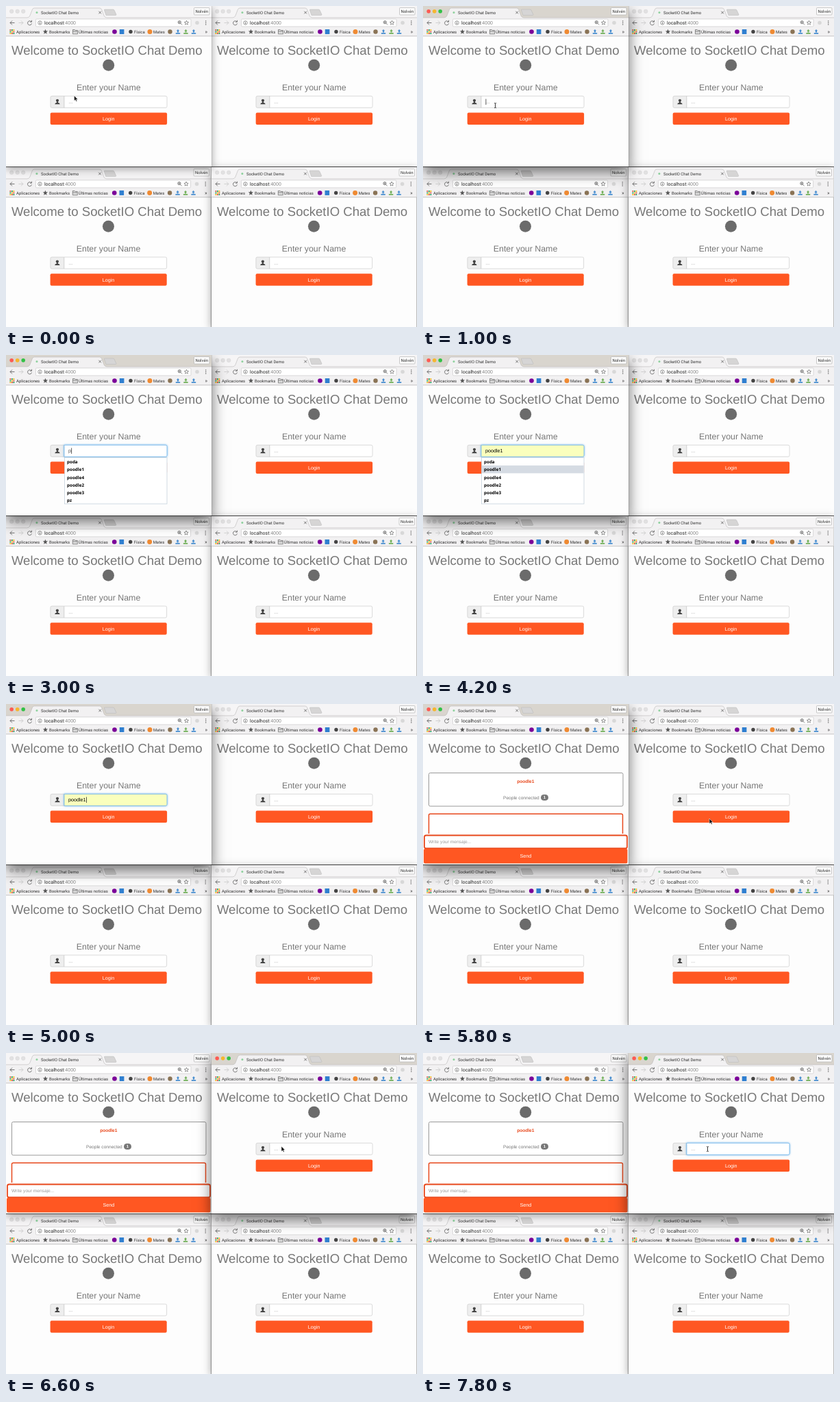
An HTML page that plays this animation: 600x468 px, repeating every 8 s.

```html
<!DOCTYPE html>
<html lang="en">
<head>
<meta charset="utf-8">
<title>Chat demo</title>
<style>
  html, body { margin: 0; width: 100%; height: 100%; overflow: hidden; background: #777; }
  #stage { position: relative; width: 600px; height: 468px; overflow: hidden; }
  .win { position: absolute; z-index: 1; width: 299.5px; height: 234px; box-shadow: 0 0 1px rgba(0,0,0,.5), 0 3px 12px rgba(0,0,0,.38); }
  .win.low { height: 233px; }
  .win.front { z-index: 2; }
  .win.active { z-index: 5; box-shadow: 0 0 1px rgba(0,0,0,.6), 0 8px 20px rgba(0,0,0,.58); }
  svg { display: block; overflow: hidden; width: 100%; height: 100%; }
  text { text-rendering: geometricPrecision; }
  .ui { font: 6px Roboto, sans-serif; fill: #333; }
  .page { font: 7.2px "Liberation Sans", Arial, sans-serif; fill: #777; }
  .mid { text-anchor: middle; }
  .strip { fill: #f6f5f6; }
  .light { fill: #e2e1e2; stroke: #d2d1d2; stroke-width: .4; }
  .active .strip { fill: #d9d5ce; }
  .active .light { stroke: none; fill: var(--on); }
  .line { fill: none; stroke: #666; stroke-width: .9; }
  .field { fill: #fff; stroke: #ccc; stroke-width: .7; }
  .focus .field { stroke: #66afe9; filter: drop-shadow(0 0 1.5px #66afe9); }
  .filled .field { fill: #faffbd; }
  .typed { fill: #555; }
  .filled .typed { fill: #000; }
  .off { display: none; }
  .list { font: bold 6.3px "Open Sans", "Noto Sans", sans-serif; fill: #000; }
  #mouse { position: absolute; z-index: 9; left: 0; top: 0; width: 12px; height: 14px; overflow: visible; }
</style>
</head>
<body>
<div id="stage">
  <svg id="mouse">
    <path id="arrow" d="M0 0V7.600L1.800 6L3 8.600L4.300 8L3.100 5.500H5.400Z" fill="#111" stroke="#fff" stroke-width=".5"/>
    <path id="beam" d="M-1.5-3.5Q0-3.5 0-2.5Q0-3.5 1.5-3.5M0-2.5V2.5M-1.5 3.5Q0 3.5 0 2.5Q0 3.5 1.5 3.5" fill="none" stroke="#222" stroke-width=".9"/>
  </svg>
</div>
<script>
const ORANGE = '#ff5722', RIM = '#e8481c';
const NAME = 'poodle1';
const NAMES = ['poda', NAME, 'poodle4', 'poodle2', 'poodle3', 'pz'];
const ROW = 11.3;

const text = (x, y, s, cls = '', more = '') => `<text x="${x}" y="${y}" class="${cls}" ${more}>${s}</text>`;
const rect = (x, y, w, h, fill, more = '') => `<rect x="${x}" y="${y}" width="${w}" height="${h}" fill="${fill}" ${more}/>`;
const dot = (x, y, r, fill, more = '') => `<circle cx="${x}" cy="${y}" r="${r}" fill="${fill}" ${more}/>`;
const line = (d, more = '') => `<path class="line" d="${d}" ${more}/>`;

function star(x, y, r, more) {
  const pts = Array.from({length: 10}, (_, i) => {
    const a = i * Math.PI / 5 - Math.PI / 2, q = i % 2 ? r * .45 : r;
    return `${(x + q * Math.cos(a)).toFixed(1)},${(y + q * Math.sin(a)).toFixed(1)}`;
  });
  return `<polygon points="${pts.join(' ')}" ${more}/>`;
}

const tray = (x, color) =>
  `<path d="M${x} 34l2.300 2.600h-1.300v2h-2v-2h-1.300z" fill="${color}"/>` + rect(x - 3.2, 39, 6.4, 1.8, color);

function appGrid() {
  const colors = ['#db4437', '#0f9d58', '#f4b400'];
  let s = '';
  for (let row = 0; row < 3; row++)
    for (let col = 0; col < 3; col++)
      s += rect(5.5 + col * 2.5, 34.2 + row * 2.5, 1.8, 1.8, colors[(row + col) % 3]);
  return s;
}

function chrome() {
  const lights = ['#fc5b53', '#f6b62e', '#32c146']
    .map((c, i) => dot(8.2 + i * 8.5, 7.8, 2.8, '', `class="light" style="--on:${c}"`)).join('');
  return `<g class="ui">
    <rect class="strip" width="300" height="18"/>${lights}
    <path d="M146 13.5L143.5 6Q143 5 144.5 5H156Q157.5 5 158 6L161 12.5Q161 13.5 160 13.5Z" fill="#d6d5d5" stroke="#b5b4b4" stroke-width=".5"/>
    ${rect(0, 17, 300, 27, '#f2f1f2')}
    <path d="M0 17H31Q34 17 35 14L38.5 5Q39.3 3 41.5 3H136.5Q138.8 3 139.6 5L143 14Q144 17 147 17H300" fill="#f2f1f2" stroke="#b9b8b8" stroke-width=".6"/>
    ${rect(33, 16.6, 112, 1.2, '#f2f1f2')}
    ${dot(45, 9.5, 1.5, '#8fd19e')}
    ${text(51, 11.6, 'SocketIO Chat Demo')}
    ${line('M135.4 7.7l3.6 3.6m0-3.6l-3.6 3.6')}
    ${rect(274.5, 2.5, 22.5, 10.5, '#fbfbfb', 'rx="1" stroke="#aaa" stroke-width=".6"')}
    ${text(285.7, 10, 'Nolvén', 'mid')}
    ${line('M12.5 24.5H6m3-3l-3 3l3 3')}
    ${line('M18.5 24.5H25m-3-3l3 3l-3 3', 'style="stroke:#ccc"')}
    ${line('M36.8 22.8A3 3 0 1 0 37.5 25.5M37.5 20.8v2.4h-2.4')}
    ${rect(43.5, 19, 226.5, 11, '#fff', 'rx="1.3" stroke="#c4c3c4" stroke-width=".6"')}
    ${dot(49.5, 24.5, 2.7, 'none', 'stroke="#666" stroke-width=".7"')}
    ${line('M49.5 24v2.2M49.5 22.7v.7')}
    <text x="56" y="27" font-size="7" fill="#222">localhost<tspan fill="#888">:4000</tspan></text>
    ${dot(253.3, 23.7, 2.1, 'none', 'stroke="#555" stroke-width=".8"')}
    ${line('M255 25.4l2 2M252.3 23.7h2m-1-1v2')}
    ${star(263.5, 24.5, 3.3, 'fill="none" stroke="#666" stroke-width=".7"')}
    ${dot(279, 24.5, 2.8, '#d8d8d8')}
    ${[22, 24.5, 27].map(y => dot(291.7, y, .8, '#666')).join('')}
    ${appGrid()}${text(15, 39.8, 'Aplicaciones')}
    ${star(57.5, 37.6, 3.8, 'fill="#555"')}${text(63, 39.8, 'Bookmarks')}
    <path d="M97.5 34.5h2.8l1 1h3.2v5.3h-7zM97.5 37h7" fill="#ddd" stroke="#666" stroke-width=".7"/>
    ${text(106, 39.8, 'Últimas noticias')}
    ${dot(158.5, 37.5, 3.3, '#7b0099')}
    ${rect(165.8, 34, 6.6, 7, '#2f7fd0')}
    ${dot(182, 37.5, 2.7, '#444')}${text(187, 39.8, 'Física')}
    ${dot(210, 37.5, 3.5, '#ef8a32')}${text(215, 39.8, 'Mates')}
    ${dot(239.5, 37.5, 3.2, '#8a7355')}
    ${tray(251, '#4a8fd0')}${tray(262.5, '#72b05a')}${tray(274, '#4a8fd0')}
    ${text(290.5, 39.8, '»', '', 'font-size="7.5"')}
    ${rect(0, 43.5, 300, .8, '#b9b8b9')}
  </g>`;
}

function loginForm() {
  const rows = NAMES.map((n, i) => text(89, 157.9 + i * ROW, n)).join('');
  return `<g class="login">
    ${text(149.8, 123, 'Enter your Name', 'mid', 'font-size="12.4"')}
    <path d="M85 131.3H67q-2 0-2 2V146.300q0 2 2 2H85z" fill="#eee" stroke="#ccc" stroke-width=".7"/>
    ${dot(75, 137.8, 2.1, '#444')}
    <path d="M71.3 143.3q0-2 2.7-2.600v-1.500h2v1.500q2.700.6 2.700 2.600z" fill="#444"/>
    <path class="field" d="M85 131.3H233q2 0 2 2V146.300q0 2-2 2H85z"/>
    ${text(91.5, 142.3, '...', 'hint', 'fill="#999"')}
    ${text(91, 142.3, '', 'typed')}
    <rect class="caret" y="135.5" width=".8" height="8.5" fill="#333"/>
    ${rect(64.7, 155.6, 170.4, 17.5, ORANGE, 'rx="2"')}
    ${text(149.8, 166.8, 'Login', 'mid', 'fill="#fff"')}
    <g class="list">
      ${rect(85.5, 149.5, 149.5, 67.5, '#fff', 'stroke="#bccbd6" stroke-width=".7"')}
      <rect class="pick" x="85.9" width="148.7" height="${ROW}" fill="#d5dbe3"/>${rows}
    </g>
  </g>`;
}

function chatRoom() {
  const small = 'font-size="6.6"';
  return `<g class="chat">
    ${rect(8.5, 100.5, 283.5, 48.5, '#fff', 'rx="2" stroke="#999" stroke-width="1"')}
    ${text(149.8, 115.2, NAME, 'mid', `${small} font-weight="bold" fill="${RIM}"`)}
    ${text(117, 138.5, 'People connected', '', small)}
    ${rect(172, 132, 11, 8.8, '#777', 'rx="4.4"')}
    ${text(177.5, 138.4, '1', 'mid', 'font-size="6" font-weight="bold" fill="#fff"')}
    <path d="M8.500 189V162.300q0-2 2-2H289.500q2 0 2 2V189" fill="#fff" stroke="${RIM}" stroke-width="1.5"/>
    ${rect(0, 189, 300, 45, '#fdfdfd')}
    ${rect(2, 191.5, 296, 19, '#fff', `rx="2.5" stroke="${RIM}" stroke-width="1.8"`)}
    ${text(8, 203.3, 'Write your mensaje...', '', `${small} fill="#999"`)}
    ${rect(1, 211, 297.5, 21.5, ORANGE, 'rx="2"')}
    ${text(149.8, 224.3, 'Send', 'mid', 'fill="#fff"')}
  </g>`;
}

const stage = document.getElementById('stage');
const wins = [[0, 0], [300, 0], [0, 235], [300, 235]].map(([x, y]) => {
  const el = document.createElement('div');
  el.className = y ? 'win low' : 'win';
  el.style.cssText = `left:${x}px;top:${y}px`;
  el.innerHTML = `<svg viewBox="0 0 300 234" preserveAspectRatio="xMinYMin slice">
    ${rect(0, 0, 300, 235, '#fdfdfd')}${chrome()}
    <g class="page">
      ${text(147.3, 71, 'Welcome to SocketIO Chat Demo', 'mid', 'font-size="18.6"')}
      ${dot(149.7, 86.3, 8.5, '#6b6b6b')}
      ${loginForm()}${chatRoom()}
    </g></svg>`;
  stage.append(el);
  const find = c => el.querySelector('.' + c);
  return {el, login: find('login'), chat: find('chat'), hint: find('hint'), typed: find('typed'),
    caret: find('caret'), list: find('list'), pick: find('pick')};
});
wins[0].el.classList.add('front');

const show = (el, on) => el.classList.toggle('off', !on);

function setWin(w, {active, focus, value = '', caret, list, pick = -1, chat, filled}) {
  w.el.classList.toggle('active', !!active);
  w.login.classList.toggle('focus', !!focus);
  w.login.classList.toggle('filled', !!filled);
  show(w.login, !chat);
  show(w.chat, chat);
  show(w.hint, !value);
  show(w.caret, caret);
  show(w.list, list);
  show(w.pick, pick >= 0);
  w.pick.setAttribute('y', 149.8 + pick * ROW);
  w.typed.textContent = value;
  const end = {p: 95.3, [NAME]: 117.2}[value] || 91.5;
  w.caret.setAttribute('x', end);
}

// Pointer stops: time, x, y
const TRAIL = [[0, 99.5, 130.7], [200, 103, 137], [400, 105.5, 145], [5400, 190, 164], [5600, 310, 170],
  [5800, 418, 167], [6000, 410, 152], [6200, 402, 136], [7000, 409, 139], [7200, 415.5, 140]];
const arrow = document.getElementById('arrow'), beam = document.getElementById('beam');
const mouse = document.getElementById('mouse');

function draw(t) {
  const blink = from => t >= from && Math.floor((t - from) / 600) % 2 === 0;
  const filled = t >= 3400 && t < 5400;
  setWin(wins[0], {
    active: t >= 200 && t < 6400,
    focus: t >= 1200 && t < 5400,
    value: filled ? NAMES[t < 3800 ? 0 : 1] : t >= 2600 ? 'p' : '',
    filled,
    caret: t < 2200 ? blink(1000) : t < 3400 || t >= 4800,
    list: t >= 2600 && t < 4800,
    pick: t < 3400 ? -1 : t < 3800 ? 0 : 1,
    chat: t >= 5400
  });
  setWin(wins[1], {active: t >= 6400, focus: t >= 7200, caret: blink(7200) && t < 7800});

  const [, x, y] = TRAIL.filter(p => p[0] <= t).pop();
  const isBeam = t >= 400 && t < 5400 || t >= 7200;
  mouse.style.transform = `translate(${x}px,${y}px)`;
  show(mouse, t < 2400 || t >= 5400);
  show(arrow, !isBeam);
  show(beam, isBeam);
}

wins.slice(2).forEach(w => setWin(w, {}));
const start = performance.now();
let last = -1;
function tick() {
  const t = Math.floor((performance.now() - start) % 8000 / 200) * 200;
  if (t !== last) draw(last = t);
  requestAnimationFrame(tick);
}
tick();
</script>
</body>
</html>
```
